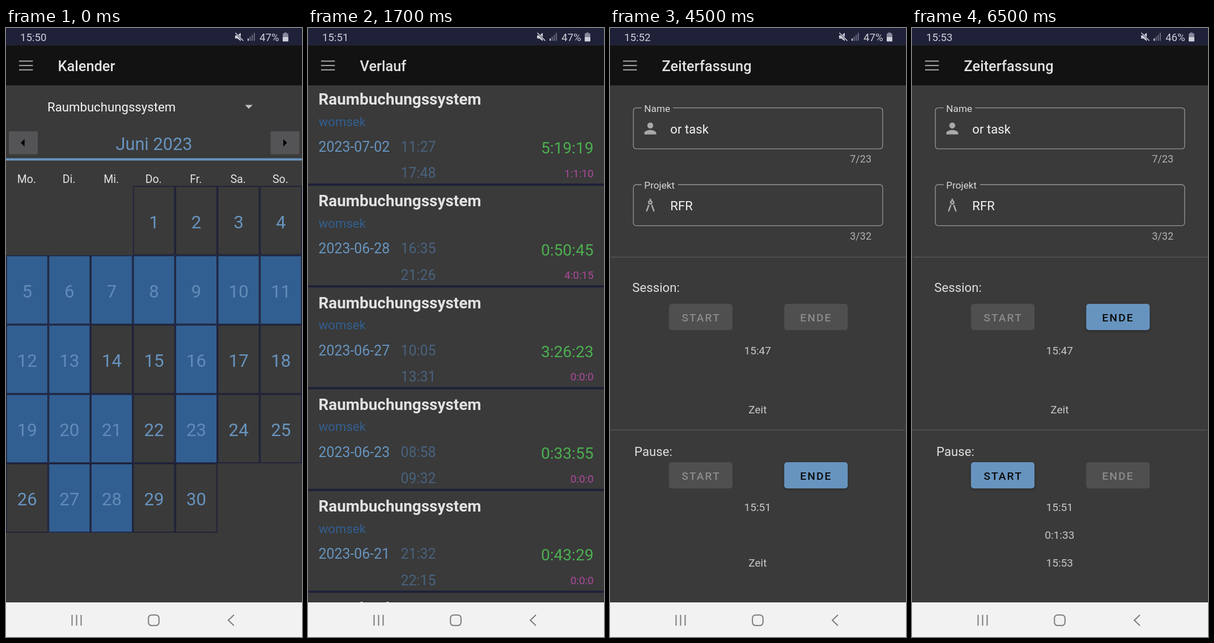
Write an HTML page with a canvas that moves like this. It is 522 px wide and 1073 px high and loops after 8000 ms.

```html
<!DOCTYPE html>
<html lang="de">
<head>
<meta charset="utf-8">
<title>Zeiterfassung</title>
<style>
  html, body { margin: 0; width: 100%; height: 100%; overflow: hidden; background: #3a3a3a; }
  canvas { display: block; width: 522px; height: 1073px; }
</style>
</head>
<body>
<canvas id="stage"></canvas>
<script>
const W = 522, H = 1073, LOOP = 8000;
const BLUE = '#6794bf', BOOKED = '#325f91', NAVY = '#1f2139', PANEL = '#3a3a3a';
const canvas = document.getElementById('stage');
const ratio = window.devicePixelRatio || 1;
canvas.width = W * ratio;
canvas.height = H * ratio;
const ctx = canvas.getContext('2d');
ctx.scale(ratio, ratio);

function text(str, x, y, size, color, { align = 'left', weight = 400, spacing = 0 } = {}) {
  ctx.font = `${weight} ${size}px Roboto, sans-serif`;
  ctx.letterSpacing = spacing + 'px';
  ctx.textAlign = align;
  ctx.fillStyle = color;
  ctx.fillText(str, x, y);
}

function rect(x, y, w, h, color) {
  ctx.fillStyle = color;
  ctx.fillRect(x, y, w, h);
}

function roundRect(x, y, w, h, r) {
  ctx.beginPath();
  ctx.roundRect(x, y, w, h, r);
}

function line(points, color, width) {
  ctx.beginPath();
  points.forEach(([x, y]) => ctx.lineTo(x, y));
  ctx.strokeStyle = color;
  ctx.lineWidth = width;
  ctx.stroke();
}

function polygon(points, color) {
  ctx.beginPath();
  points.forEach(([x, y]) => ctx.lineTo(x, y));
  ctx.fillStyle = color;
  ctx.fill();
}

// Icons are drawn on a 24-unit grid.
function icon(path, x, y, scale, color) {
  ctx.save();
  ctx.translate(x, y);
  ctx.scale(scale, scale);
  ctx.fillStyle = color;
  ctx.fill(new Path2D(path), 'evenodd');
  ctx.restore();
}

const PERSON = 'M8 8a4 4 0 1 0 8 0a4 4 0 1 0-8 0z M12 14c-2.67 0-8 1.34-8 4v2h16v-2c0-2.66-5.33-4-8-4z';
const DIVIDERS = 'M6.4 18.8L6.6 21l1.6-1.5L11 11.9q-1-.3-1.8-1z M14.8 10.9q-.8.7-1.8 1l2.8 7.6L17.4 21l.3-2.2z ' +
  'M15 8a3 3 0 0 0-2-2.8V3h-2v2.2A3 3 0 1 0 15 8z M11 8a1 1 0 1 0 2 0a1 1 0 1 0-2 0z';

function drawStatus(clock, battery) {
  const color = '#cdcfd8';
  rect(0, 0, W, 30.5, NAVY);
  text(clock, 25, 23, 18.7, color);
  text(battery + '%', 447, 23, 18.7, color);

  polygon([[404, 13], [408, 13], [414, 8.5], [414, 23], [408, 18.5], [404, 18.5]], color);
  line([[403.5, 7.5], [419, 23]], NAVY, 3);
  line([[404.5, 8.5], [418.5, 22.5]], color, 1.6);

  for (let i = 0; i < 4; i++) {
    const h = 4 + i * 3.3;
    rect(426 + i * 3.6, 22.5 - h, 2.2, h, i ? '#62647a' : color);
  }
  rect(490.5, 8, 4.5, 2, '#85879a');
  roundRect(488, 9.5, 9.8, 14.3, 1.2);
  ctx.fillStyle = '#85879a';
  ctx.fill();
  rect(488, 16, 9.8, 7.5, color);
}

function drawHeader(title) {
  rect(0, 30.5, W, 70.5, '#121212');
  for (const y of [57.3, 65, 72.7]) rect(23, y, 24.4, 2.1, '#a2a2a2');
  text(title, 91.5, 75.7, 25.4, '#e2e2e2', { weight: 500 });
}

function drawNavigation() {
  const color = '#7b7b7b';
  rect(0, 1012, W, 61, '#f2f2f2');
  for (const x of [116.5, 124.5, 132.5]) line([[x, 1034], [x, 1053]], color, 2);
  roundRect(251.2, 1034.2, 18.6, 18.6, 5.5);
  ctx.lineWidth = 2;
  ctx.stroke();
  line([[402, 1034], [392, 1043.5], [402, 1053]], color, 2);
}

function monthButton(x, tip, base) {
  roundRect(x, 182, 51, 40.5, 2);
  ctx.fillStyle = '#545456';
  ctx.fill();
  polygon([[tip, 202.3], [base, 195.8], [base, 208.8]], '#000');
}

function drawCalendar() {
  const booked = new Set([5, 6, 7, 8, 9, 10, 11, 12, 13, 16, 19, 20, 21, 23, 27, 28]);
  const colWidth = W / 7, rowHeight = 122.2, top = 279;

  text('Raumbuchungssystem', 73, 147, 22.2, '#f4f4f4');
  polygon([[421.5, 135.5], [435, 135.5], [428.2, 142.2]], '#c2c2c2');
  monthButton(5, 26, 32.7);
  monthButton(466.5, 495.5, 489);
  text('Juni 2023', 261, 214.7, 30.7, BLUE, { align: 'center' });
  rect(0, 229.5, W, 4, BLUE);

  ['Mo.', 'Di.', 'Mi.', 'Do.', 'Fr.', 'Sa.', 'So.'].forEach((name, i) =>
    text(name, (i + 0.5) * colWidth - 0.8, 273, 19.5, '#e4e4e4', { align: 'center' }));

  for (let day = 1; day <= 30; day++) {
    const slot = day + 2;
    const x = (slot % 7) * colWidth, y = top + Math.floor(slot / 7) * rowHeight - 0.8;
    if (booked.has(day)) rect(x, y, colWidth, rowHeight, BOOKED);
    ctx.strokeStyle = NAVY;
    ctx.lineWidth = 1.7;
    ctx.strokeRect(x + 0.85, y + 0.85, colWidth - 1.7, rowHeight - 1.7);
    text(day, x + colWidth / 2, y + 74.4, 31.2, booked.has(day) ? '#5f8cb9' : BLUE, { align: 'center' });
  }
}

function drawHistory() {
  const entries = [
    ['2023-07-02', '11:27', '17:48', '5:19:19', '1:1:10'],
    ['2023-06-28', '16:35', '21:26', '0:50:45', '4:0:15'],
    ['2023-06-27', '10:05', '13:31', '3:26:23', '0:0:0'],
    ['2023-06-23', '08:58', '09:32', '0:33:55', '0:0:0'],
    ['2023-06-21', '21:32', '22:15', '0:43:29', '0:0:0'],
    []
  ];
  entries.forEach(([date, start, end, work, pause], i) => {
    const y = 101 + i * 179.3;
    text('Raumbuchungssystem', 18.5, y + 34, 27.9, '#e2e2e2', { weight: 700 });
    if (!date) return;
    text('womsek', 18.7, y + 71.5, 22.2, BOOKED);
    text(date, 18.5, y + 117, 24.9, BLUE);
    text(start, 163.5, y + 117, 24.9, '#48627e');
    text(end, 163.5, y + 163.3, 24.9, '#48627e');
    text(work, 503.5, y + 120.2, 28.1, '#4caf50', { align: 'right' });
    text(pause, 503.7, y + 161.6, 18.9, '#ae499c', { align: 'right' });
    rect(0, y + 173, W, 4, NAVY);
  });
}

function drawField(y, label, labelEnd, value, count, path, focused) {
  roundRect(41.2, y, 439.6, 72.3, 5);
  ctx.strokeStyle = focused ? BLUE : '#979797';
  ctx.lineWidth = focused ? 2.5 : 1.3;
  ctx.stroke();
  rect(56, y - 3, labelEnd - 56, 6, PANEL);
  text(label, 60.3, y + 7.3, 17.2, focused ? BLUE : '#d8d8d8');
  icon(path, 55.3, y + 20.7, 1.31, '#a9a9a9');
  text(value, 106.3, y + 45, 22.2, '#f2f2f2');
  text(count, 461, y + 96.5, 18, '#b2b2b2', { align: 'right' });
}

function drawButton(x, y, label, active) {
  ctx.save();
  if (active) {
    ctx.shadowColor = 'rgba(0,0,0,.35)';
    ctx.shadowBlur = 4 * ratio;
    ctx.shadowOffsetY = 1.5 * ratio;
  }
  roundRect(x, y, 112, 46.3, 5);
  ctx.fillStyle = active ? BLUE : '#4f4f4f';
  ctx.fill();
  ctx.restore();
  text(label, x + (label === 'START' ? 22.4 : 28), y + 30.8, 19.2, active ? '#0a0a0a' : '#8b8b8b',
    { weight: 500, spacing: 2.1 });
}

function drawSection(title, titleX, titleY, buttonY, active, times) {
  text(title, titleX, titleY, 22.2, '#dfdfdf');
  drawButton(104, buttonY, 'START', active === 'START');
  drawButton(307.2, buttonY, 'ENDE', active === 'ENDE');
  times.forEach(([label, y]) => text(label, 260.3, y, 19.1, '#c8c8c8', { align: 'center' }));
}

function drawTracker({ focused, session, pause, started = 'Zeit', paused = 'Zeit', resumed = 'Zeit', length = '' }) {
  drawField(140.6, 'Name', 111, 'or task', '7/23', PERSON, false);
  drawField(276, 'Projekt', 120, 'RFR', '3/32', DIVIDERS, focused);
  if (focused) {
    rect(146, 298, 2, 28.5, BLUE);
    ctx.beginPath();
    ctx.arc(451, 312, 13, 0, Math.PI * 2);
    ctx.fillStyle = '#bdbdbd';
    ctx.fill();
    line([[446, 307], [456, 317]], PANEL, 2.5);
    line([[456, 307], [446, 317]], PANEL, 2.5);
  }
  rect(2, 403, 520, 1.2, '#5b5b5b');
  drawSection('Session:', 39.3, 464.8, 486, session, [[started, 575.3], ['Zeit', 678.7]]);
  rect(1, 707.8, 519, 1.2, '#5b5b5b');
  drawSection('Pause:', 43, 753.8, 765, pause, [[paused, 850.7], [length, 900], [resumed, 949]]);
}

const scenes = [
  { until: 500, clock: '15:50', battery: 47, title: 'Kalender', draw: drawCalendar },
  { until: 2500, clock: '15:51', battery: 47, title: 'Verlauf', draw: drawHistory },
  { until: 4500, clock: '15:47', battery: 48, title: 'Zeiterfassung',
    draw: () => drawTracker({ focused: true, session: 'START' }) },
  { until: 6500, clock: '15:52', battery: 47, title: 'Zeiterfassung',
    draw: () => drawTracker({ pause: 'ENDE', started: '15:47', paused: '15:51' }) },
  { until: LOOP, clock: '15:53', battery: 46, title: 'Zeiterfassung',
    draw: () => drawTracker({ session: 'ENDE', pause: 'START', started: '15:47',
      paused: '15:51', length: '0:1:33', resumed: '15:53' }) }
];

const begin = performance.now();

function render() {
  const time = Math.max(0, performance.now() - begin) % LOOP;
  const scene = scenes.find(s => time < s.until);
  rect(0, 0, W, H, PANEL);
  scene.draw();
  drawStatus(scene.clock, scene.battery);
  drawHeader(scene.title);
  drawNavigation();
  requestAnimationFrame(render);
}
render();
</script>
</body>
</html>
```
